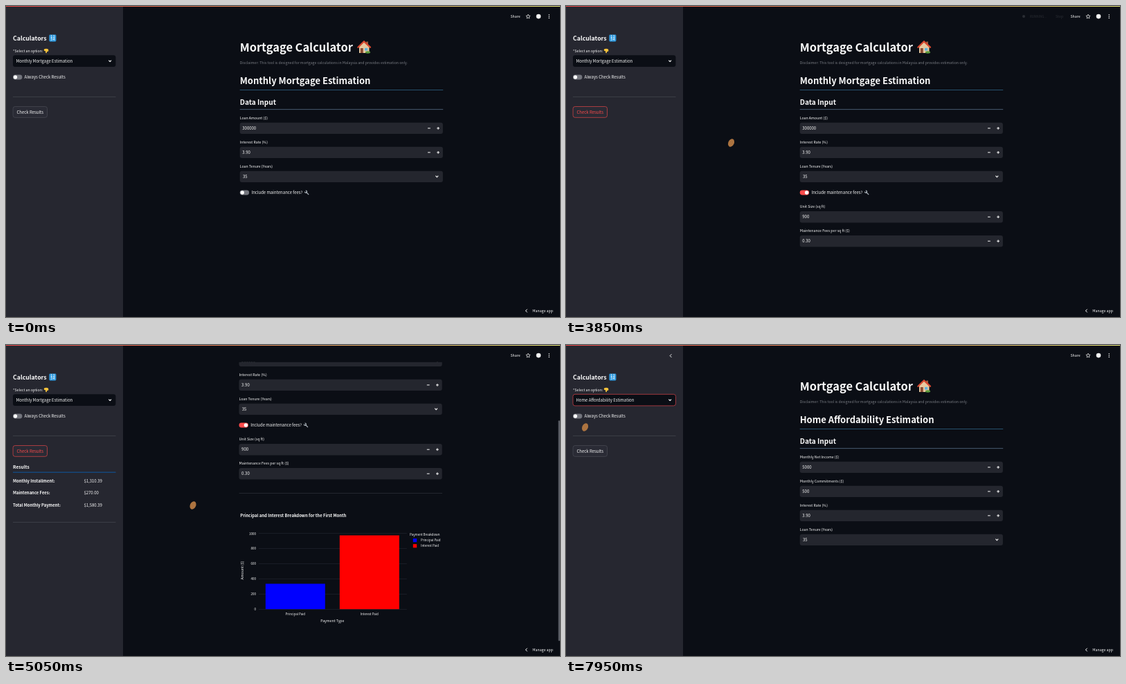
Write an HTML page that moves like this. It is 800 px wide and 450 px high and loops after 8000 ms.

```html
<!DOCTYPE html>
<html lang="en">
<head>
<meta charset="utf-8">
<title>Mortgage Calculator</title>
<style>
html, body { margin: 0; width: 100%; height: 100%; overflow: hidden; background: #0b0e15; }
svg { display: block; width: 100vw; height: 100vh; }
text { font-family: "Noto Sans CJK JP", "Noto Sans CJK SC", "Noto Sans CJK", "Open Sans", sans-serif; white-space: pre; }
</style>
</head>
<body>
<svg id="stage" viewBox="0 0 800 450" xmlns="http://www.w3.org/2000/svg"></svg>
<script>
const LOOP = 8000;
const INK = '#fafafa', BG = '#0b0e15', PANEL = '#262730', FIELD = '#24262e', RED = '#ff4b4b';

// Markup helpers; text is placed by the middle of its capitals.
const text = (s, x, cy, size = 5.97, o = {}) =>
  `<text x="${x}" y="${(cy + size * 0.366).toFixed(2)}" font-size="${size}" fill="${o.fill || INK}"` +
  ` font-weight="${o.weight || 400}" text-anchor="${o.anchor || 'start'}" ${o.extra || ''}>${s}</text>`;
const rect = (x, y, w, h, fill, r = 0, extra = '') =>
  `<rect x="${x}" y="${y}" width="${w}" height="${h}" rx="${r}" fill="${fill}" ${extra}/>`;
const path = (d, stroke, w = 0.9, extra = '') =>
  `<path d="${d}" fill="none" stroke="${stroke}" stroke-width="${w}" ${extra}/>`;
const group = (id, body, extra = '') => `<g id="${id}" ${extra}>${body}</g>`;
const chevron = (x, y) => path(`M${x - 1.9} ${y - 1}l1.9 1.9l1.9 -1.9`, INK, 1.1);
const back = (x, y) => path(`M${x + 1.2} ${y - 2.3}l-2.3 2.3l2.3 2.3`, INK, 1);
const label = (s, y) => text(s, 337.7, y, 5.22);

function numberRow(name, value, y) {
  return label(name, y) + rect(337.7, y + 6.7, 293.2, 16.4, FIELD, 3) + text(value, 341.3, y + 15) +
    path(`M609 ${y + 14.9}h3.8M622.2 ${y + 14.9}h3.8M624.1 ${y + 13}v3.8`, INK, 1);
}

function selectRow(name, value, y) {
  return label(name, y) + rect(337.7, y + 6.7, 293.2, 16.4, FIELD, 3) + text(value, 342, y + 15) +
    chevron(622.3, y + 14.7);
}

const toggle = (id, x, y) =>
  `<rect id="${id}Track" x="${x}" y="${y - 3.4}" width="13.4" height="6.8" rx="3.4" fill="#73757d"/>` +
  `<circle id="${id}Knob" cx="${x + 3.5}" cy="${y}" r="2.7" fill="#fff"/>`;

function heading(title) {
  return text(title, 337.7, 108.6, 13, { weight: 600 }) + rect(337.7, 121.1, 293.5, 0.9, '#2a5a78', 0, 'class="rule1"') +
    text('Data Input', 337.7, 138.8, 10.1, { weight: 600 }) + rect(337.7, 149.2, 293.5, 0.9, '#4c6078', 0, 'class="rule2"');
}

const house =
  rect(520.2, 51.5, 2.7, 6, '#a2603f') +
  '<path d="M510 59l7-7l7.5 7v9h-14.5z" fill="#e8c9a0"/>' +
  path('M508.4 59.7l8.6-8.4l8.9 8.4', '#d8482f', 2.3, 'stroke-linejoin="round" stroke-linecap="round"') +
  rect(511.8, 61, 4, 7, '#8a4a32') + rect(518, 60.8, 4.2, 3.8, '#5fb2de') +
  '<ellipse cx="522.5" cy="67" rx="3.6" ry="1.7" fill="#5c9a3c"/>';

const wrench = path('M433.4 269.2l3.4 3.4', '#aab2ba', 1.3, 'stroke-linecap="round"') +
  path('M431.4 268.6a1.6 1.6 0 1 0 1.4 -1.5', '#aab2ba', 1.1);

const pointDown = '<path d="M55 62.6q3-1.6 6 0l.4 2.5q-1 1.3-2.3.8l-.2 1.9q-.9.9-1.6 0l-.2-2.6q-1.6.3-2.3-1z" fill="#f7c33c"/>';

const numbers = rect(62.4, 41.4, 10, 10, '#2f9be0', 1.4) +
  text('1 2', 67.4, 44.4, 4.3, { anchor: 'middle', weight: 700 }) +
  text('3 4', 67.4, 48.7, 4.3, { anchor: 'middle', weight: 700 });

function chart() {
  const base = 536.2, unit = 0.1095;
  const bar = (x, v, fill) => rect(x, base - v * unit, 86, v * unit, fill);
  let s = rect(337.7, 368, 293.5, 0.6, '#353841') +
    text('Principal and Interest Breakdown for the First Month', 339.4, 400.6, 5.95, { weight: 700 });
  for (let v = 0; v <= 1000; v += 200) {
    const y = base - v * unit;
    s += rect(366, y - 0.2, 214, 0.45, '#2c303a') + text(v, 362.2, y + 0.2, 4.48, { anchor: 'end' });
  }
  s += bar(376, 335.39, '#0000ff') + bar(483, 975, '#ff0000');
  s += text('Principal Paid', 419, 543.4, 4.48, { anchor: 'middle' }) +
    text('Interest Paid', 526, 543.4, 4.48, { anchor: 'middle' }) +
    text('Payment Type', 472.5, 553, 5.2, { anchor: 'middle' }) +
    text('Amount ($)', 342, 480, 5.2, { anchor: 'middle', extra: 'transform="rotate(-90 342 480)"' });
  s += text('Payment Breakdown', 584.2, 428.8, 4.5) +
    rect(589, 434, 5.4, 5.2, '#0000ff') + text('Principal Paid', 600.3, 436.6, 4.45) +
    rect(589, 442.1, 5.4, 5.2, '#ff0000') + text('Interest Paid', 600.3, 444.7, 4.45);
  return s;
}

const mortgagePage = heading('Monthly Mortgage Estimation') +
  numberRow('Loan Amount ($)', '300000', 162) +
  numberRow('Interest Rate (%)', '3.90', 197) +
  selectRow('Loan Tenure (Years)', '35', 232) +
  toggle('fee', 337.7, 270) + text('Include maintenance fees?', 354.4, 270.2) + wrench +
  group('fees', numberRow('Unit Size (sq ft)', '900', 290.3) +
    numberRow('Maintenance Fees per sq ft ($)', '0.30', 325.3)) +
  group('chart', chart());

const homePage = heading('Home Affordability Estimation') +
  numberRow('Monthly Net Income ($)', '5000', 162) +
  numberRow('Monthly Commitments ($)', '500', 197) +
  numberRow('Interest Rate (%)', '3.90', 232) +
  selectRow('Loan Tenure (Years)', '35', 267);

const content = text('Mortgage Calculator', 337.7, 59.7, 16.4, { weight: 700 }) + house +
  text('Disclaimer: This tool is designed for mortgage calculations in Malaysia and provides estimation only.',
    337.7, 82, 5.22, { fill: '#7b7e85' }) +
  group('mortgage', mortgagePage) + group('home', homePage);

const star = path('M754 12.1l.9 2l2.2.2l-1.7 1.5l.5 2.2l-1.9-1.2l-1.9 1.2l.5-2.2l-1.7-1.5l2.2-.2z', INK, 0.7);
const dots = [12.8, 15.2, 17.6].map(y => `<circle cx="784.2" cy="${y}" r=".75" fill="${INK}"/>`).join('');
const header = rect(169, 0, 631, 24.8, BG) +
  group('running', '<circle cx="661" cy="15" r="2" fill="#fafafa"/>' + text('RUNNING...', 670, 15.2, 4.5) + text('Stop', 707, 15.2, 5.2)) +
  text('Share', 728.4, 15.3, 5.3) + star + `<circle cx="769" cy="15.1" r="3.3" fill="${INK}"/>` + dots;

const resultRow = (name, value, y) => text(name, 10, y, 5.9, { weight: 700 }) + text(value, 112.4, y);
const results = text('Results', 10, 176.3, 6.6, { weight: 700 }) + rect(10, 183.7, 148.5, 0.9, '#0b5cab') +
  resultRow('Monthly Installment:', '$1,310.39', 196.8) +
  resultRow('Maintenance Fees:', '$270.00', 214.2) +
  resultRow('Total Monthly Payment:', '$1,580.39', 231.6) +
  rect(10, 256.4, 148.5, 0.6, '#4a4c55');

const menu = rect(9.8, 88.6, 148.8, 49, BG, 3) +
  '<rect id="hover" x="9.8" y="104.7" width="148.8" height="16.4" fill="#1d1f28"/>' +
  ['Monthly Mortgage Estimation', 'Home Affordability Estimation', 'Upfront Costs Estimation']
    .map((s, i) => text(s, 16.7, 96.4 + i * 16.6)).join('');

const sidebar = rect(0, 0, 169, 450, PANEL) + group('collapse', back(151.2, 15.6)) +
  text('Calculators', 10, 46.8, 8.75, { weight: 600 }) + numbers +
  text('*Select an option:', 10, 64.9, 5.22) + pointDown +
  rect(10, 71.3, 148.4, 16.6, BG, 3, 'id="select" stroke-width=".7"') +
  text('Monthly Mortgage Estimation', 14.5, 79.9, 5.97, { extra: 'id="choice"' }) + chevron(150.2, 79.6) +
  toggle('always', 10, 103) + text('Always Check Results', 26.5, 103.3) +
  rect(10, 131.1, 148.5, 0.6, '#4a4c55') +
  rect(10.1, 145.5, 49.4, 15.8, '#2a2b35', 3, 'id="button" stroke-width=".6"') +
  text('Check Results', 34.8, 153.5, 5.97, { anchor: 'middle', extra: 'id="buttonText"' }) +
  group('results', results) + group('menu', menu);

const hand = '<path d="M-1.3-3.6q1-1.2 1.8 0v3l2.6.5q1.2.4 1 1.7l-.6 2.9h-4.2l-2.4-3.3q.2-1.2 1.8-.2z" fill="#fff" stroke="#111" stroke-width=".6"/>';
const pet = '<ellipse rx="4.2" ry="6" fill="#ad7440" transform="rotate(25)"/>';

const $ = id => document.getElementById(id);
$('stage').innerHTML =
  `<defs><linearGradient id="strip"><stop stop-color="#ff4b4b"/><stop offset="1" stop-color="#fffd80"/></linearGradient></defs>` +
  rect(0, 0, 800, 450, BG) + group('content', content) + header +
  rect(797.6, 0, 2.4, 319, '#5a5d65', 1.2, 'id="thumb"') +
  rect(737, 432, 63, 18, BG) + back(751.5, 441) + text('Manage app', 760.2, 441.2, 5.27) +
  sidebar + rect(0, 0, 800, 0.9, 'url(#strip)') +
  group('cursor', group('pet', pet) + group('hand', hand));

// Keys are [time, ...values], eased between neighbours.
function track(keys, t) {
  let i = 0;
  while (i < keys.length - 2 && t >= keys[i + 1][0]) i++;
  const a = keys[i], b = keys[i + 1];
  const u = Math.min(1, Math.max(0, (t - a[0]) / (b[0] - a[0])));
  const e = u * u * (3 - 2 * u);
  return a.slice(1).map((v, k) => v + (b[k + 1] - v) * e);
}

const CURSOR = [
  [400, 735, 116], [1150, 345, 271], [1450, 345, 271], [2000, 307.5, 242], [2100, 307.5, 242],
  [2400, 490, 298], [2900, 350, 284], [3350, 40, 155], [3650, 40, 155], [3850, 238.5, 198],
  [4050, 330, 257], [4400, 319.5, 256], [4750, 316, 254], [5050, 270, 232], [5300, 85, 81],
  [5550, 85, 81], [5900, 73.5, 112], [6600, 73.5, 112], [7200, 58, 117], [7950, 27.5, 119]
];
const SCROLL = [
  [4200, 0], [4400, 41.4], [4550, 83], [4800, 166.7], [4950, 166.7], [5050, 154], [5200, 125]
];
const RUNNING = [[1350, 1700], [3500, 3900], [6450, 6750]];

const show = (id, on) => $(id).setAttribute('display', on ? 'inline' : 'none');
const set = (id, name, value) => $(id).setAttribute(name, value);
const within = (t, a, b) => t >= a && t < b;
const paintAll = (cls, fill) => document.querySelectorAll(cls).forEach(n => n.setAttribute('fill', fill));

function render(t) {
  const home = t >= 6700;
  const done = within(t, 4000, 6700);
  const feeOn = t >= 1300;
  const [x, y] = track(CURSOR, t);
  const scroll = done ? track(SCROLL, t)[0] : 0;

  set('content', 'transform', `translate(${done ? -1.2 : 0} ${-scroll})`);
  paintAll('.rule1', done ? '#1460b0' : '#2a5a78');
  paintAll('.rule2', done ? '#1d8a4a' : '#4c6078');
  show('mortgage', !home);
  show('home', home);
  show('fees', t >= 1500);
  show('chart', done);
  const slide = Math.min(1, Math.max(0, (t - 1250) / 100));
  set('feeTrack', 'fill', feeOn ? RED : '#73757d');
  set('feeKnob', 'cx', 341.2 + 6.4 * slide);

  show('thumb', done && x > 169);
  set('thumb', 'y', scroll * 450 / 635);

  const run = RUNNING.find(([a, b]) => within(t, a, b));
  show('running', run);
  if (run) set('running', 'opacity', 0.13);

  const pressed = within(t, 3400, 5350);
  set('button', 'stroke', pressed ? RED : '#51535b');
  set('buttonText', 'fill', pressed ? RED : INK);
  show('results', done);

  const picked = t >= 6400;
  set('select', 'stroke', t >= 5400 ? '#d8444a' : 'none');
  $('choice').textContent = picked ? 'Home Affordability Estimation' : 'Monthly Mortgage Estimation';
  show('menu', within(t, 5450, 6400));
  set('hover', 'y', y > 104.7 ? 104.7 : 88.6);
  show('collapse', x < 169);

  const pointing = within(t, 1100, 1550) || within(t, 3300, 3700) || within(t, 5250, 6700);
  show('cursor', t >= 400);
  set('cursor', 'transform', `translate(${x} ${y})`);
  show('hand', pointing);
  show('pet', !pointing);
}

function frame() {
  render(performance.now() % LOOP);
  requestAnimationFrame(frame);
}
frame();
</script>
</body>
</html>
```
